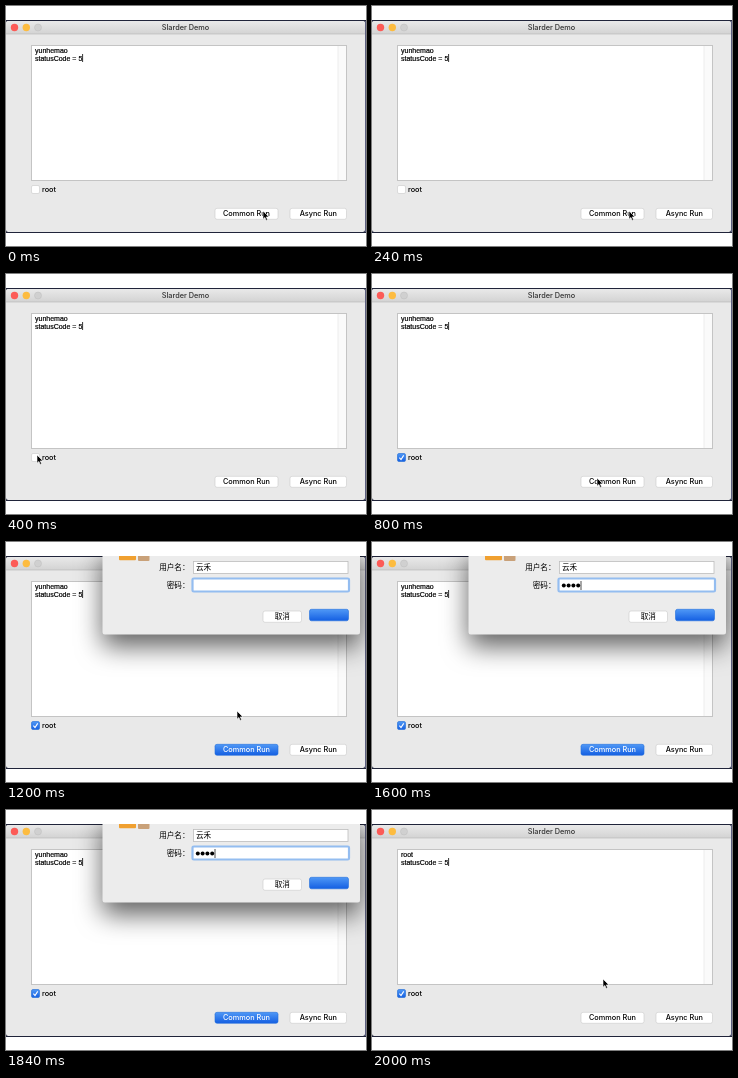
Write an HTML page that moves like this. It is 360 px wide and 240 px high and loops after 2.4 s.

```html
<!DOCTYPE html>
<html lang="en">
<head>
<meta charset="utf-8">
<title>Slarder Demo</title>
<style>
  html, body { margin: 0; width: 100%; height: 100%; overflow: hidden; background: #fff; }
  svg { display: block; width: 360px; height: 240px; }
  text { font: 500 7.3px Inter, sans-serif; fill: #000; }
  .mid { text-anchor: middle; }
  .log { font: 7px "Liberation Sans", Arial, sans-serif; stroke: #000; stroke-width: .2; }
  .cjk { font: 500 7.6px "Noto Sans CJK SC", "Noto Sans CJK", sans-serif; }
  .end { text-anchor: end; }
  .button { fill: #fff; stroke: #c9c9c9; stroke-width: .6; }
  .blue { fill: url(#blue); stroke: #236fdc; stroke-width: .6; }
  .field { fill: #fff; stroke: #bdbdbd; stroke-width: .8; }
  .sheet { filter: drop-shadow(0 12px 13px rgba(0, 0, 0, .62)); }
</style>
</head>
<body>
<svg viewBox="0 0 360 240">
  <defs>
    <linearGradient id="bar" x2="0" y2="1">
      <stop stop-color="#e9e9e9"/><stop offset="1" stop-color="#d3d3d3"/>
    </linearGradient>
    <linearGradient id="blue" x2="0" y2="1">
      <stop stop-color="#4f98f6"/><stop offset="1" stop-color="#145fe2"/>
    </linearGradient>
    <clipPath id="screen"><rect y="14" width="360" height="213"/></clipPath>
  </defs>

  <g clip-path="url(#screen)">
    <rect y="14" width="360" height="213" fill="#20243a"/>
    <rect x="359" y="15" width="1" height="211" fill="#5c5f80"/>
    <rect y="15" width="359" height="211" rx="2.5" fill="#e9e9e9"/>
    <path d="M0 28V17q0-2 2-2H357q2 0 2 2V28z" fill="url(#bar)"/>
    <path d="M0 28H359" stroke="#b9b9b9" stroke-width=".7"/>
    <circle cx="8.5" cy="21.5" r="3.7" fill="#fc5b57"/>
    <circle cx="20.3" cy="21.5" r="3.7" fill="#fdbc40"/>
    <circle cx="32" cy="21.5" r="3.5" fill="#d0d0d0" stroke="#bcbcbc" stroke-width=".5"/>
    <text class="mid" x="179.5" y="24.2" style="fill:#333">Slarder Demo</text>

    <rect x="25.5" y="39.5" width="315" height="135" fill="#fff" stroke="#c4c4c4"/>
    <rect x="332" y="40" width="8" height="134" fill="#fafafa"/>
    <path d="M332 40V174" stroke="#e6e6e6" stroke-width=".7"/>
    <text class="log" id="user" x="29" y="46.5"></text>
    <text class="log" x="29" y="54.5">statusCode = 5</text>
    <path d="M76.6 48V56" stroke="#000" stroke-width=".8"/>

    <rect class="button" x="25.5" y="179.5" width="8" height="8" rx="1.5"/>
    <g id="checked">
      <rect class="blue" x="25.5" y="179.5" width="8" height="8" rx="1.5"/>
      <path d="M27.4 183.7l1.6 1.9 2.7-4.2" fill="none" stroke="#fff" stroke-width="1.1"/>
    </g>
    <text x="36" y="186.2">root</text>

    <rect id="common" x="209" y="202.3" width="63" height="11" rx="2"/>
    <text class="mid" id="commonLabel" x="240.5" y="210.4">Common Run</text>
    <rect class="button" x="284" y="202.3" width="56.5" height="11" rx="2"/>
    <text class="mid" x="312.3" y="210.4">Async Run</text>

    <g id="dialog">
      <rect class="sheet" x="96.5" y="4" width="257.5" height="88.5" rx="2.5" fill="#ececec"/>
      <rect x="113" y="10" width="17" height="8.3" rx="1" fill="#f0a030"/>
      <rect x="132" y="10" width="11.5" height="9" rx="1" fill="#c9a179"/>
      <text class="cjk end" x="183.5" y="28">用户名：</text>
      <text class="cjk end" x="183.5" y="46">密码：</text>
      <rect class="field" x="187.5" y="19.5" width="154.5" height="12"/>
      <text class="cjk" x="190" y="28.2">云禾</text>
      <rect x="186.5" y="36.5" width="156.5" height="13" rx="1.2" fill="#fff" stroke="#94bdf0" stroke-width="2.2"/>
      <g id="password">
        <circle cx="191.8" cy="43.5" r="2"/><circle cx="196.6" cy="43.5" r="2"/>
        <circle cx="201.4" cy="43.5" r="2"/><circle cx="206.2" cy="43.5" r="2"/>
        <path d="M209 39V48" stroke="#000" stroke-width=".7"/>
      </g>
      <rect class="button" x="257" y="69" width="38.5" height="11.3" rx="2"/>
      <text class="cjk mid" x="276.3" y="77.4">取消</text>
      <rect class="blue" x="303.5" y="67.3" width="39" height="11.5" rx="2"/>
    </g>

    <path id="pointer" d="M0 0V8.2L1.9 6.4 3.2 9.4 4.6 8.8 3.3 5.9H5.9Z"
      fill="#000" stroke="#fff" stroke-width=".6"/>
  </g>
</svg>
<script>
  const STEP = 400;
  const USER = 'yunhemao';
  const steps = [
    { user: USER, pointer: [257, 205] },
    { user: USER, pointer: [31, 181] },
    { user: USER, pointer: [225, 204], checked: true },
    { user: USER, pointer: [231, 169], checked: true, dialog: true },
    { user: USER, checked: true, dialog: true, password: true },
    { user: 'root', pointer: [231, 169], checked: true },
  ];
  const $ = id => document.getElementById(id);
  const show = (id, visible) => $(id).setAttribute('display', visible ? 'inline' : 'none');

  function render(state) {
    $('user').textContent = state.user;
    show('checked', state.checked);
    show('dialog', state.dialog);
    show('password', state.password);
    show('pointer', state.pointer);
    if (state.pointer) $('pointer').setAttribute('transform', `translate(${state.pointer})`);
    $('common').setAttribute('class', state.dialog ? 'blue' : 'button');
    $('commonLabel').style.fill = state.dialog ? '#fff' : '#000';
  }

  let current;
  function tick() {
    const state = steps[Math.floor(performance.now() / STEP) % steps.length];
    if (state !== current) render(current = state);
    requestAnimationFrame(tick);
  }
  tick();
</script>
</body>
</html>
```
